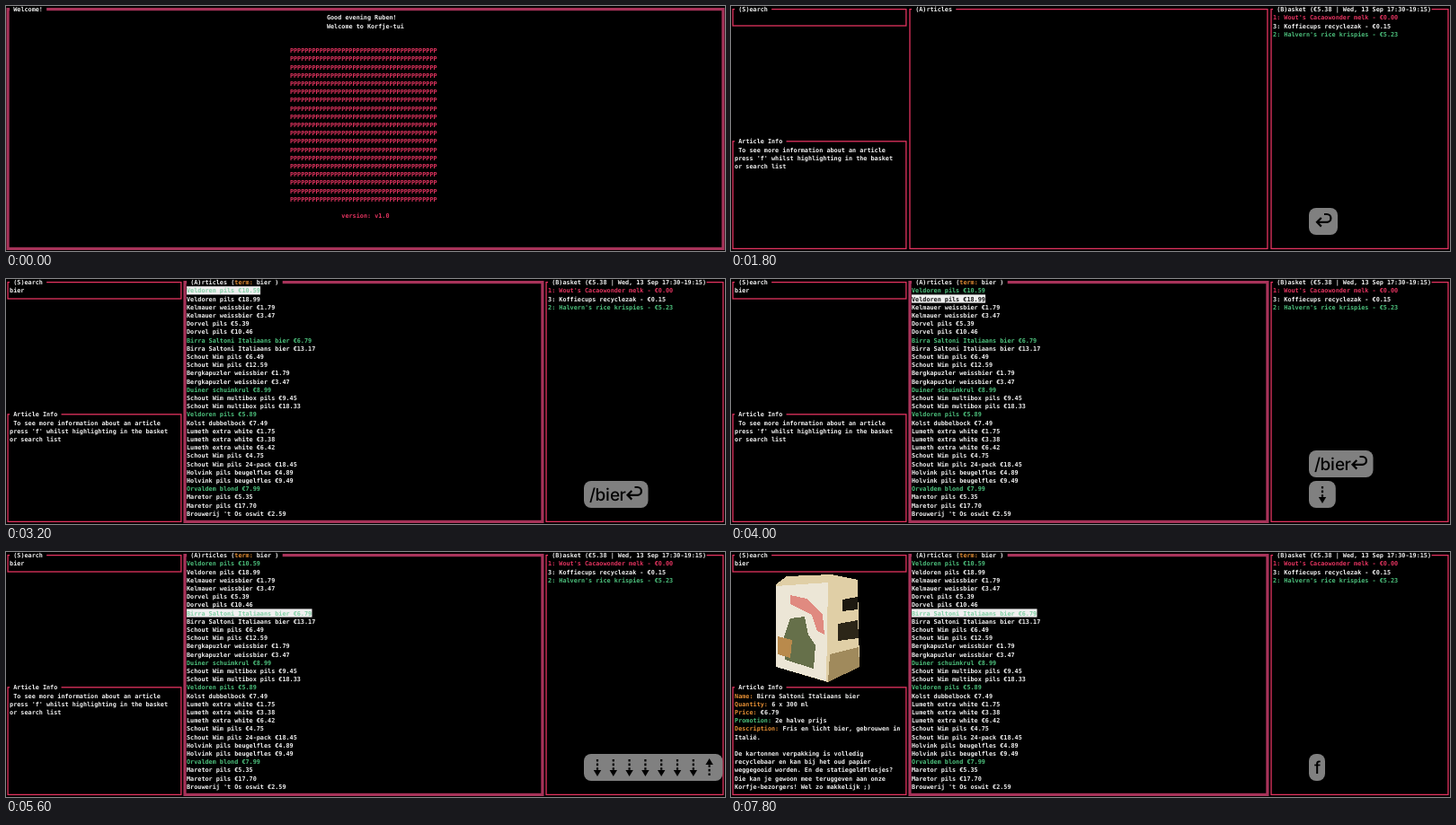
An HTML page that plays this animation: 800x273 px, repeating every 8000 ms.

```html
<!DOCTYPE html>
<html lang="en">
<head>
<meta charset="utf-8">
<title>Terminal grocery shopping</title>
<style>
  html, body { margin: 0; width: 100%; height: 100%; overflow: hidden; background: #000; }
  svg { display: block; width: 100vw; height: 100vh; }
  text { white-space: pre; text-rendering: geometricPrecision; }
  .cell { font: bold 6.815px "DejaVu Sans Mono", monospace; }
  .key { font: 500 19px Inter, sans-serif; }
  .icon { fill: none; stroke: #000; stroke-width: 2.2; }
</style>
</head>
<body>
<svg id="stage" viewBox="0 0 800 273"></svg>
<script>
const LOOP = 8000, COL = 800 / 195, ROW = 9.2;
const PINK = '#e2335f', FOCUS_PINK = '#a8335a', GREEN = '#4cc07c', ORANGE = '#e38d33', WHITE = '#f0f0f0';
const MAIN_AT = 800, SEARCH_AT = 2000, RESULTS_AT = 3200, INFO_AT = 6600;

// An asterisk marks an article on promotion.
const articles = `*Veldoren pils €10.59
Veldoren pils €18.99
Kelmauer weissbier €1.79
Kelmauer weissbier €3.47
Dorvel pils €5.39
Dorvel pils €10.46
*Birra Saltoni Italiaans bier €6.79
Birra Saltoni Italiaans bier €13.17
Schout Wim pils €6.49
Schout Wim pils €12.59
Bergkapuzler weissbier €1.79
Bergkapuzler weissbier €3.47
*Duiner schuimkrul €8.99
Schout Wim multibox pils €9.45
Schout Wim multibox pils €18.33
*Veldoren pils €5.89
Kolst dubbelbock €7.49
Lumeth extra white €1.75
Lumeth extra white €3.38
Lumeth extra white €6.42
Schout Wim pils €4.75
Schout Wim pils 24-pack €18.45
Holvink pils beugelfles €4.89
Holvink pils beugelfles €9.49
*Orvaldem blond €7.99
Maretor pils €5.35
Maretor pils €17.70
Brouwerij 't Os oswit €2.59`.split('\n');

const hint = [
  " To see more information about an article",
  "press 'f' whilst highlighting in the basket",
  "or search list"
];

const details = [
  ['Name:', 'Birra Saltoni Italiaans bier'],
  ['Quantity:', '6 x 300 ml'],
  ['Price:', '€6.79'],
  ['Promotion:', '2e halve prijs'],
  ['Description:', 'Fris en licht bier, gebrouwen in']
];

const description = [
  'Italië.',
  '',
  'De kartonnen verpakking is volledig',
  'recyclebaar en kan bij het oud papier',
  'weggegooid worden. En de statiegeldflesjes?',
  'Die kan je gewoon mee teruggeven aan onze',
  'Korfje-bezorgers! Wel zo makkelijk ;)'
];

// Each group of keystrokes shares one bubble: [time, key].
const typing = [[2000, '/'], [2200, 'b'], [2400, 'i'], [2600, 'e'], [2700, 'r'], [2800, '⏎']];
const moves = [...Array.from({ length: 7 }, (_, i) => [4000 + i * 200, '↓']), [5600, '↑']];
const bubbles = [
  { keys: [[MAIN_AT, '⏎']], end: 2000 },
  { keys: typing, end: 4800 },
  { keys: moves, end: 7600 },
  { keys: [[6400, 'f']], end: LOOP }
];
const keyWidth = { '/': 6.5, b: 11.5, i: 5, e: 10.5, r: 6, f: 6, '⏎': 20, '↓': 17.8, '↑': 17.8 };

const pressed = (keys, time) => keys.filter(([at]) => at <= time).map(([, key]) => key);
const rowCentre = row => 3.6 + row * ROW;

function rect(x, y, width, height, attrs) {
  return `<rect x="${x}" y="${y}" width="${width}" height="${height}" ${attrs}/>`;
}

function block(col, row, length, fill) {
  return rect(col * COL, rowCentre(row) - ROW / 2, length * COL, ROW, `fill="${fill}"`);
}

function write(col, row, string, fill = WHITE) {
  return `<text class="cell" x="${col * COL}" y="${rowCentre(row) + 2.5}" fill="${fill}">${string}</text>`;
}

function panel(col, row, endCol, endRow, title, focused) {
  const x = (col + .5) * COL, y = rowCentre(row);
  const width = (endCol - col) * COL, height = rowCentre(endRow) - y;
  const line = focused ? `stroke="${FOCUS_PINK}" stroke-width="3.2"` : `stroke="${PINK}" stroke-width="1.3"`;
  return rect(x, y, width, height, `fill="none" ${line}`) +
    block(col + 1, row, title.length + 1, '#000') + write(col + 2, row, title);
}

function welcome() {
  let out = panel(0, 0, 194, 29, 'Welcome! ', true);
  out += write(87, 1, 'Good evening Ruben!') + write(87, 2, 'Welcome to Korfje-tui');
  for (let row = 5; row < 24; row++) out += write(77, row, 'P'.repeat(40), PINK);
  return out + write(91, 25, 'version: v1.0', PINK);
}

function search(time) {
  const focused = time >= SEARCH_AT && time < RESULTS_AT;
  const query = pressed(typing.slice(1, -1), time).join('');
  return panel(0, 0, 47, 2, '(S)earch ', focused) + write(1, 1, query) +
    (focused ? block(1 + query.length, 1, 1, WHITE) : '');
}

function results(time) {
  if (time < RESULTS_AT) return panel(48, 0, 145, 29, '(A)rticles ');
  const selected = pressed(moves, time).reduce((n, key) => n + (key === '↓' ? 1 : -1), 0);
  let out = panel(48, 0, 145, 29, '(A)rticles (      bier ) ', true) + write(62, 0, 'term:', ORANGE);
  articles.forEach((line, i) => {
    const name = line.replace('*', ''), promoted = name !== line;
    if (i === selected) out += block(49, i + 1, name.length, '#f0f0f0');
    const plain = i === selected ? '#111' : WHITE;
    out += write(49, i + 1, name, promoted ? (i === selected ? '#83d0a6' : GREEN) : plain);
  });
  return out;
}

function basket() {
  return panel(146, 0, 194, 29, '(B)asket (€5.38 | Wed, 13 Sep 17:30-19:15)') +
    write(147, 1, "1: Wout's Cacaowonder melk - €0.00", PINK) +
    write(147, 2, '3: Koffiecups recyclezak - €0.15') +
    write(147, 3, "2: Halvern's rice krispies - €5.23", GREEN);
}

function productPhoto() {
  const shape = (points, fill) => `<polygon points="${points}" fill="${fill}"/>`;
  return '<g shape-rendering="crispEdges">' +
    shape('50,36 62,27 112,25 141,31 143,128 108,145 50,128', '#e0cfa6') +
    shape('50,38 108,34 106,144 50,128', '#ece6d6') +
    shape('66,48 84,52 102,70 104,92 96,88 90,70 66,58', '#e08a80') +
    shape('66,74 82,72 86,92 94,104 92,130 60,120 58,98', '#66704a') +
    shape('52,94 68,98 66,118 52,114', '#b98a4c') +
    shape('124,53 141,50 141,64 124,66', '#1c1810') +
    shape('119,80 141,76 142,96 119,99', '#2c2618') +
    shape('110,114 142,106 143,128 108,145', '#a08a5c') + '</g>';
}

function info(time) {
  let out = panel(0, 16, 47, 29, 'Article Info ');
  if (time < INFO_AT) {
    hint.forEach((line, i) => out += write(1, 17 + i, line));
    return out;
  }
  details.forEach(([label, value], i) => {
    out += write(1, 17 + i, label, label === 'Promotion:' ? GREEN : ORANGE);
    out += write(2 + label.length, 17 + i, value);
  });
  description.forEach((line, i) => out += write(1, 22 + i, line));
  return out + productPhoto();
}

function keyCap(key, x, y) {
  if (key === '⏎') {
    return `<path class="icon" d="M${x + 11} ${y + 7}h3a4.4 4.4 0 0 1 0 8.8h-11m4.8-4.8l-4.8 4.8 4.8 4.8"/>`;
  }
  if (key === '↓' || key === '↑') {
    const turn = key === '↑' ? `rotate(180 ${x + 9} ${y + 15})` : '';
    return `<g transform="${turn}"><path class="icon" stroke-dasharray="2.6 2" d="M${x + 9} ${y + 6}v13"/>` +
      `<path d="M${x + 4.8} ${y + 18}h8.4l-4.2 7z"/></g>`;
  }
  return `<text class="key" x="${x}" y="${y + 22}">${key}</text>`;
}

function keystrokes(time) {
  const visible = bubbles.filter(({ keys, end }) => keys[0][0] <= time && time < end);
  return visible.reverse().map(({ keys }, level) => {
    const y = 225 - level * 34;
    let x = 649, caps = '';
    for (const key of pressed(keys, time)) {
      caps += keyCap(key, x, y);
      x += keyWidth[key];
    }
    return rect(643, y, x - 637, 30, 'rx="8" fill="#808080"') + caps;
  }).join('');
}

const stage = document.getElementById('stage');
let shown = '';

function draw() {
  const time = performance.now() % LOOP;
  const scene = time < MAIN_AT
    ? welcome()
    : search(time) + results(time) + basket() + info(time) + keystrokes(time);
  if (scene !== shown) stage.innerHTML = shown = scene;
  requestAnimationFrame(draw);
}
draw();
</script>
</body>
</html>
```
